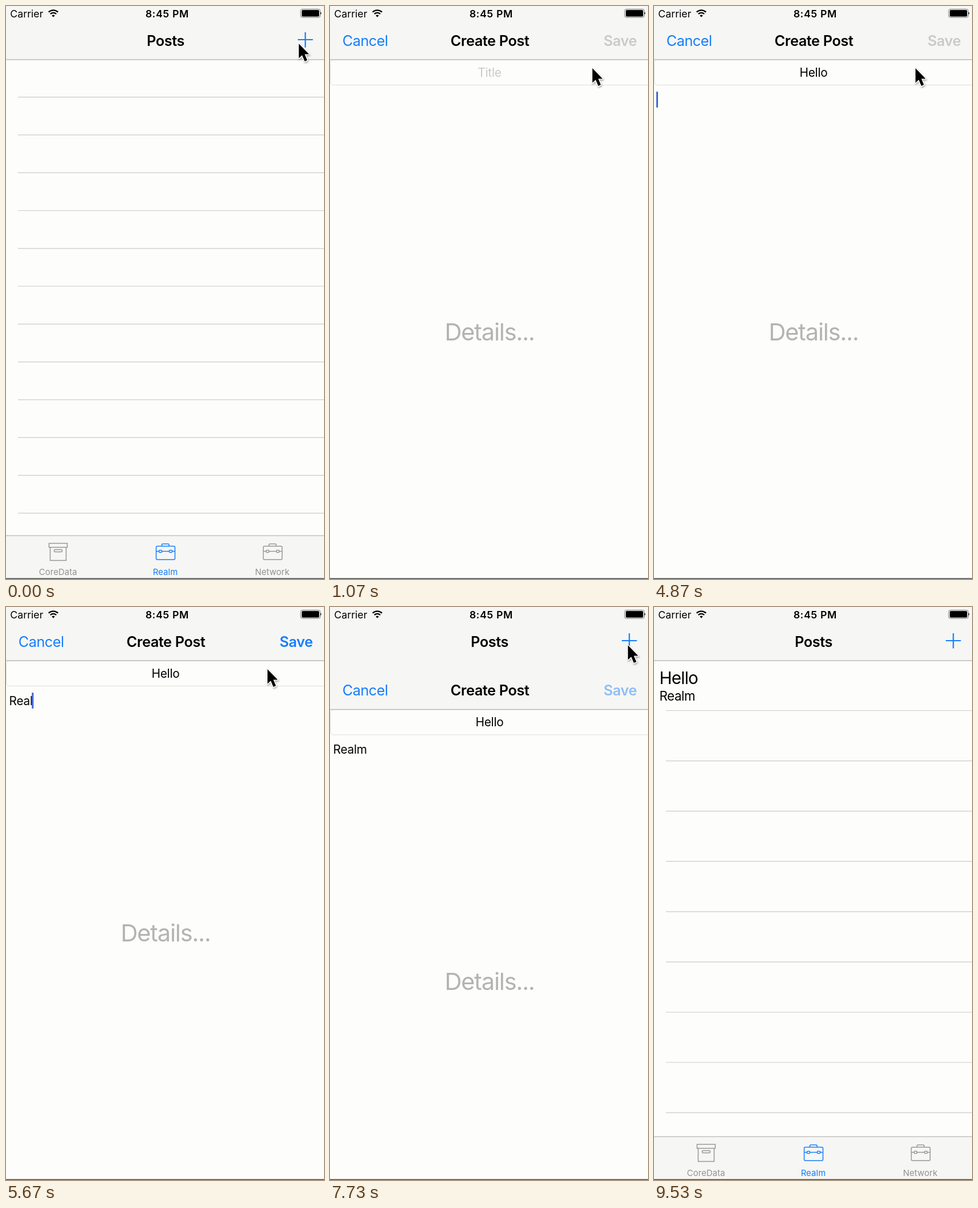
An HTML page that plays this animation: 558x1004 px, repeating every 9.59 s.

```html
<!DOCTYPE html>
<html lang="en">
<head>
<meta charset="utf-8">
<title>Create a post</title>
<style>
  html, body { margin: 0; width: 100%; height: 100%; overflow: hidden; background: #fdfdfb; }
  svg { display: block; width: 100%; height: 100%; }
  text { font-family: Inter, Roboto, sans-serif; white-space: pre; }
  .status { font-size: 17.8px; }
  .nav { font-size: 25.3px; letter-spacing: -.55px; }
  .bold { font-weight: 600; letter-spacing: -.4px; }
  .body { font-size: 20.8px; letter-spacing: -.2px; }
  .tab { font-size: 14.9px; letter-spacing: .1px; }
  .clock { letter-spacing: .6px; }
  .mid { text-anchor: middle; }
  .blue { fill: #157efb; }
  .icon { fill: none; stroke-width: 1.5; }
</style>
</head>
<body>
<svg viewBox="0 0 558 1004" preserveAspectRatio="none">
  <defs>
    <g id="case">
      <rect x="-16.5" y="946.5" width="33" height="23.5" rx="2"/>
      <path d="M-6.5 946V944Q-6.5 942.5 -5 942.5H4.5Q6 942.5 6 944V946M-16.5 955.5H-11.5M-6.5 955.5H6.5M11.5 955.5H16.5"/>
      <rect x="-11.5" y="953.5" width="5" height="4" rx="1.5"/>
      <rect x="6.5" y="953.5" width="5" height="4" rx="1.5"/>
    </g>
    <filter id="soft" x="-50%" y="-50%" width="200%" height="200%">
      <feDropShadow dx="1" dy="2" stdDeviation="1.5" flood-opacity=".35"/>
    </filter>
  </defs>

  <rect width="558" height="1004" fill="#fdfdfb"/>
  <path id="rows" stroke="#cbcbcf" stroke-width="1.2"/>
  <g id="post">
    <text x="9.5" y="135" font-size="29.7" letter-spacing="-.8">Hello</text>
    <text x="9.5" y="164" font-size="22.3" letter-spacing="-.4">Realm</text>
  </g>
  <rect width="558" height="94" fill="#f6f6f5"/>
  <path d="M0 94H558" stroke="#bdbdb8" stroke-width="1.3"/>
  <text class="nav bold mid" x="280" y="70">Posts</text>
  <path d="M512 59H538.5M525.2 46V72.5" stroke="#157efb" stroke-width="2.2"/>

  <rect y="928" width="558" height="76" fill="#f6f6f5"/>
  <path d="M0 928H558" stroke="#c2c2be" stroke-width="1.3"/>
  <g class="icon" stroke="#969692">
    <path d="M75.5 941.5H107.5V948.5H75.5ZM77.5 948.5V971.5H105.5V948.5"/>
    <rect x="84.5" y="952.5" width="14" height="4" rx="2"/>
    <use href="#case" x="468"/>
  </g>
  <use class="icon" href="#case" x="280" stroke="#157efb"/>
  <g class="tab mid" fill="#929292">
    <text x="91.3" y="997">CoreData</text>
    <text class="blue" x="279.5" y="997">Realm</text>
    <text x="467.3" y="997">Network</text>
  </g>

  <g id="sheet">
    <rect width="558" height="1004" fill="#fdfdfb"/>
    <rect y="-2" width="558" height="96" fill="#f6f6f5"/>
    <rect x=".5" y="94.5" width="570" height="44" rx="6" fill="#fdfdfb" stroke="#dededa"/>
    <path d="M0 94H558" stroke="#bdbdb8" stroke-width="1.3"/>
    <text class="nav blue" x="21.8" y="70">Cancel</text>
    <text class="nav bold mid" x="280.5" y="70">Create Post</text>
    <text id="save" class="nav bold" x="538.3" y="70" text-anchor="end">Save</text>
    <text id="title" class="body mid" x="280" y="123.5"></text>
    <text class="mid" x="280" y="586" font-size="41.6" letter-spacing="-1.2" fill="#b3b3b3">Details...</text>
    <text id="details" class="body" x="5.5" y="171.5"></text>
    <rect id="caret" width="3" height="28" rx="1" fill="#4466d6"/>
  </g>

  <text class="status" x="7.2" y="19.5">Carrier</text>
  <g fill="none" stroke="#000" stroke-width="2.4">
    <path d="M74.8 10.6A12 12 0 0 1 91.2 10.6M77.8 14A7.5 7.5 0 0 1 88.2 14"/>
    <path d="M83 19.5L80.3 16.7A4 4 0 0 1 85.7 16.7Z" fill="#000" stroke="none"/>
  </g>
  <text class="status bold clock mid" x="282.8" y="19.5">8:45 PM</text>
  <rect x="517" y="5.5" width="34.5" height="14.5" rx="3" fill="none" stroke="#777"/>
  <rect x="519" y="7" width="30.5" height="11.5" rx="1.8"/>
  <path d="M552 10.5Q554.5 12.7 552 15Z"/>

  <path d="M0 1002.5H558" stroke="#a2a2a0"/>
  <path d="M0 1003.5H558" stroke="#4c4c4c"/>
  <path id="pointer" d="M.8 1V26.5L6.6 21.2L11.1 32L15.6 30L11.1 19.5H18.8Z" stroke="#fff" stroke-width="2.6" paint-order="stroke" stroke-linejoin="round" filter="url(#soft)"/>
</svg>
<script>
const LOOP = 9590, HEIGHT = 1004;
const OPEN = 300, FOCUS = 1500, TAB = 4420, PRESS = 7560, CLOSE = 7720, SLIDE = 500;
const titleKeys = [2680, 2870, 3050, 3230, 3420];
const detailKeys = [5120, 5290, 5440, 5600, 5760];
const track = [
  [0, 513, 65], [180, 518, 64], [480, 518, 64], [980, 460, 108], [1300, 458, 108],
  [6800, 458, 108], [7400, 522, 66], [8300, 522, 66], [8900, 610, 40]
];

const el = id => document.getElementById(id);
const [rows, post, sheet, save, title, details, caret, pointer] =
  ['rows', 'post', 'sheet', 'save', 'title', 'details', 'caret', 'pointer'].map(el);
const set = (node, attrs) => { for (const k in attrs) node.setAttribute(k, attrs[k]); };
const show = (node, on) => set(node, { visibility: on ? 'visible' : 'hidden' });
const write = (node, s) => { if (node.textContent !== s) node.textContent = s; };
const clamp = x => Math.min(1, Math.max(0, x));
const smooth = x => x * x * (3 - 2 * x);
const settle = x => 1 - (1 - clamp(x)) ** 4;
const typed = (word, keys, t) => word.slice(0, keys.filter(k => k <= t).length);

function lines(step, count) {
  let d = '';
  for (let i = 1; i <= count; i++) d += `M21 ${(93.4 + step * i).toFixed(1)}H558`;
  return d;
}
const emptyRows = lines(66.27, 12), filledRows = lines(88.08, 9);

function pointerAt(t) {
  let i = 0;
  while (i < track.length - 2 && t >= track[i + 1][0]) i++;
  const [a, x, y] = track[i], [b, u, v] = track[i + 1];
  const p = smooth(clamp((t - a) / (b - a)));
  return [x + (u - x) * p, y + (v - y) * p];
}

function drawCaret(t) {
  const inTitle = t < TAB;
  const keys = inTitle ? titleKeys : detailKeys;
  const since = Math.max(inTitle ? FOCUS : TAB, ...keys.filter(k => k <= t));
  show(caret, t >= FOCUS && t < PRESS && (t - since) % 1000 < 550);
  if (inTitle) {
    const width = title.textContent === 'Title' ? 0 : title.getComputedTextLength();
    set(caret, { x: 279 + width / 2, y: 102 });
  } else {
    set(caret, { x: 4 + details.getComputedTextLength(), y: 150 });
  }
}

function render(t) {
  const saved = t >= PRESS;
  set(rows, { d: saved ? filledRows : emptyRows });
  show(post, saved);

  const up = settle((t - OPEN) / SLIDE) - settle((t - CLOSE) / SLIDE);
  set(sheet, { transform: `translate(0 ${HEIGHT * (1 - up)})` });
  sheet.style.display = up > 0 ? '' : 'none';

  const name = typed('Hello', titleKeys, t), note = typed('Realm', detailKeys, t);
  write(title, name || 'Title');
  set(title, { fill: name ? '#000' : '#c9c9cb' });
  write(details, note);
  const dim = saved ? .7 * (1 - clamp((t - PRESS - 80) / 400)) : 0;
  set(save, { fill: name && note ? '#157efb' : '#cacaca', opacity: 1 - dim });
  drawCaret(t);

  set(pointer, { transform: `translate(${pointerAt(t)})` });
}

const start = performance.now();
function tick() {
  render((performance.now() - start) % LOOP);
  requestAnimationFrame(tick);
}
tick();
</script>
</body>
</html>
```
